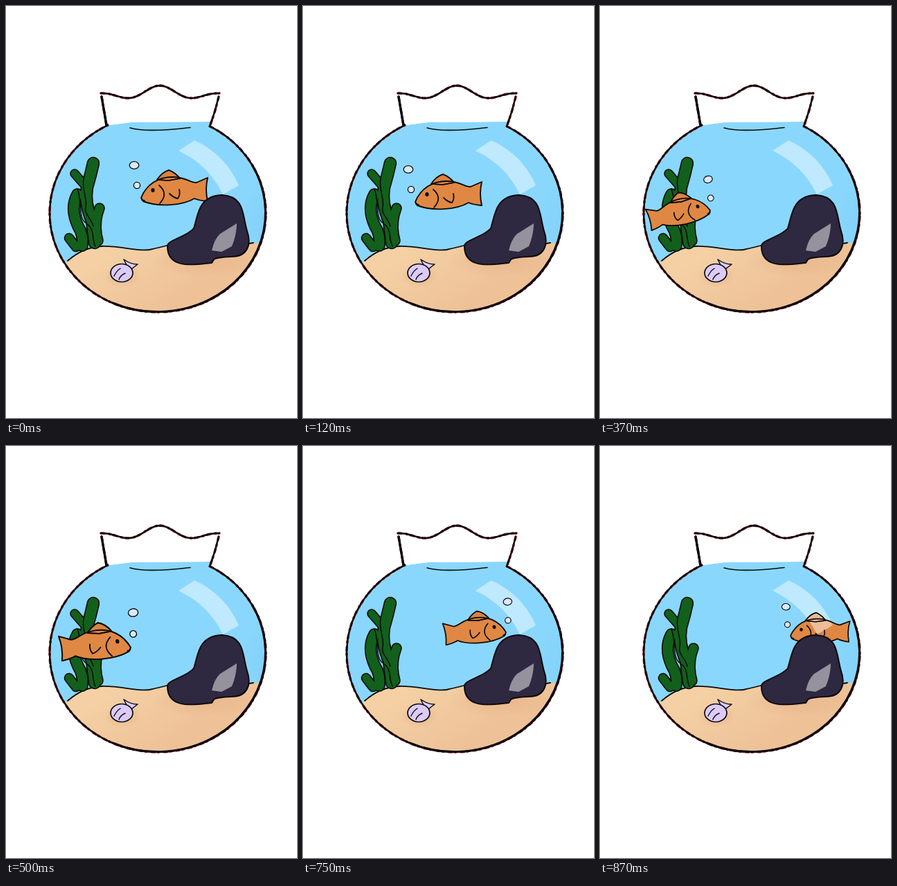
Write an HTML page with a canvas that moves like this. It is 420 by 595 pixels and loops after 1000 ms.

```html
<!DOCTYPE html>
<html lang="en">
<head>
<meta charset="utf-8">
<title>Fish bowl</title>
<style>
html, body { margin: 0; width: 100%; height: 100%; overflow: hidden; background: #fff; }
canvas { display: block; width: 420px; height: 595px; }
</style>
</head>
<body>
<canvas id="stage"></canvas>
<script>
const canvas = document.getElementById('stage');
const ctx = canvas.getContext('2d');
const dpr = window.devicePixelRatio || 1;
canvas.width = 420 * dpr;
canvas.height = 595 * dpr;
ctx.lineCap = ctx.lineJoin = 'round';

const INK = '#0b0a0c';
const path = d => new Path2D(d);

function ellipse(x, y, rx, ry, from = 0, to = 2 * Math.PI) {
  const p = new Path2D();
  p.ellipse(x, y, rx, ry, 0, from, to);
  return p;
}

function fill(p, color) {
  ctx.fillStyle = color;
  ctx.fill(p);
}

function line(p, width, color = INK) {
  ctx.lineWidth = width;
  ctx.strokeStyle = color;
  ctx.stroke(p);
}

function outlined(p, color, width) {
  fill(p, color);
  line(p, width);
}

function softSpot(x, y, rx, ry, rgb, alpha) {
  ctx.save();
  ctx.translate(x, y);
  ctx.scale(rx, ry);
  const g = ctx.createRadialGradient(0, 0, 0, 0, 0, 1);
  g.addColorStop(0, `rgba(${rgb},${alpha})`);
  g.addColorStop(1, `rgba(${rgb},0)`);
  fill(ellipse(0, 0, 1, 1), g);
  ctx.restore();
}

// The bowl is an ellipse left open under the neck.
const openFrom = -1.068, openTo = 4.232;
const glass = ellipse(219, 299, 156, 143, openFrom, openTo);
const heavyGlass = ellipse(218.5, 298.5, 156, 143, -0.5, 2);
const water = new Path2D(glass);
water.lineTo(180, 168);
water.lineTo(294, 167);
const innerRim = path('M179 176Q203 183 266 175.5');

// The neck's rim is a ripple that fades away from its middle.
const ripple = new Path2D();
for (let x = 137; x <= 308; x += 3) {
  const u = x - 222;
  const height = 18 * Math.exp(-((u / 90) ** 2));
  ripple.lineTo(x, 133 - height * (1 + Math.cos(u * Math.PI / 46)) / 2);
}
const neck = [path('M138 131L145 172'), path('M307 131Q302 153 294 174'), ripple];

const sandTop = 'M89 368Q112 348 138 347C165 346 190 355 207 352Q225 348 236 345';
const sand = path(sandTop + 'L357 342H400V460H60V390Z');
const sandLine = path(sandTop + 'M351 343L357 342');

// Weed fronds are thick round strokes: centre line and thickness.
const fronds = [
  ['M126 227Q122 245 117 262Q113 285 124 310L128 342', 17],
  ['M99 242L113 258', 12],
  ['M103 272Q92 292 104 318Q112 330 110 346', 16],
  ['M91 335L101 348', 13],
  ['M135 292Q128 310 131 330L133 339', 14]
].map(([d, width]) => [path(d), width]);
const weedFolds = path('M103 264C111 285 103 305 116 314S123 335 129 347M112 249C109 265 118 280 115 290S123 306 126 318');

const rock = path(`M233 347C232 338 262 333 271 321C277 305 276 274 312 273C345 275 341 302 348 325
  C355 345 348 362 326 362Q304 363 300 366L297 371C275 373 233 382 233 347Z`);
const rockShine = path('M297 353Q301 336 309 329L333 314Q333 330 326 347L311 355Z');
const shine = path('M249 209L272 194Q317 215 336 259L313 272Q292 229 249 209Z');

const shellFan = ellipse(167, 385.5, 16, 13);
const shellTail = path('M170 366Q180 373 190 373L181 380L174 374Z');
const shellFolds = path('M156 390Q159 383 165 379M163 395Q165 389 172 386');

// Fish faces left with its mouth at the origin.
const fish = {
  fin: path('M23-26Q30-37 40-40Q50-36 56-28L40-25Z'),
  body: path('M0 0C8-20 25-30 45-30S72-21 80-22L96-29Q92-12 96 5Q84 4 77 1C60 11 25 14 3 5Z'),
  folds: path('M26-18Q40-6 27 8M41-6Q47 0 53 1Q57-5 55-12M1 3L5 4'),
  eye: ellipse(17, -11, 2.6, 3),
  bubbles: [ellipse(-10, -47, 6.8, 5.4), ellipse(-6, -18, 4.6, 4.6)]
};

// Mouth x, y, then tilt in degrees and size.
const poses = [
  [195, 277], [162, 283], [128, 290],
  [159, 295, 16, 0.93], [180, 291, 8, 1.05], [234, 276, 13, 0.92], [293, 269, 9, 0.92],
  [275, 274, 3, 0.88]
];

function inFishSpace(step, drawPart) {
  const [x, y, tilt = 0, size = 1] = poses[step];
  const swimsRight = step > 2 && step < 7;
  ctx.save();
  ctx.translate(x, y);
  ctx.scale(swimsRight ? -size : size, size);
  ctx.rotate(tilt * Math.PI / 180);
  drawPart();
  ctx.restore();
}

function fishColor() {
  fill(fish.fin, '#d98243');
  fill(fish.body, '#e08743');
}

function fishInk() {
  line(fish.fin, 1.7);
  fill(fish.body, 'rgba(0,0,0,0)');
  line(fish.body, 1.9);
  line(fish.folds, 1.8);
  fill(fish.eye, INK);
  fish.bubbles.forEach(p => outlined(p, '#dbe9fd', 1.3));
}

function drawWater() {
  const g = ctx.createLinearGradient(170, 345, 230, 440);
  g.addColorStop(0, '#f4d0a4');
  g.addColorStop(1, '#eec197');
  ctx.save();
  ctx.clip(water);
  fill(water, '#8ad7fd');
  softSpot(372, 312, 34, 62, '112,190,240', 0.25);
  fill(sand, g);
  softSpot(285, 368, 75, 24, '229,174,132', 0.6);
  softSpot(168, 390, 27, 16, '222,170,132', 0.7);
  line(sandLine, 1.8);
  ctx.restore();
}

function drawWeed() {
  fronds.forEach(([p, width]) => line(p, width + 1.6));
  fronds.forEach(([p, width]) => line(p, width - 1.6, '#12601b'));
  line(weedFolds, 1.5);
}

function drawShell() {
  outlined(shellTail, '#dccbf8', 1.5);
  outlined(shellFan, '#dccbf8', 1.7);
  line(shellFolds, 1.4);
}

function drawGlass() {
  ctx.setLineDash([5, 7, 2, 4]);
  [glass, ...neck].forEach(p => line(p, 3.5, '#a3141a'));
  ctx.setLineDash([]);
  [glass, ...neck].forEach(p => line(p, 2.6));
  line(heavyGlass, 3);
  line(neck[0], 3.4);
  line(innerRim, 1.6);
}

function draw(ms) {
  const step = Math.ceil((Math.floor(ms / 10) + 1) / 12.5) - 1;
  ctx.setTransform(dpr, 0, 0, dpr, 0, 0);
  ctx.clearRect(0, 0, 420, 595);
  drawWater();
  drawWeed();
  drawShell();
  drawGlass();
  inFishSpace(step, fishColor);
  fill(shine, 'rgba(255,255,255,0.45)');
  inFishSpace(step, () => {
    line(fish.fin, 1.7);
    fill(fish.body, 'rgba(0,0,0,0)');
    fishInk();
  });
  outlined(rock, '#2e2840', 2);
  fill(rockShine, '#96929d');
}

function tick() {
  draw(performance.now() % 1000);
  requestAnimationFrame(tick);
}
tick();
</script>
</body>
</html>
```
